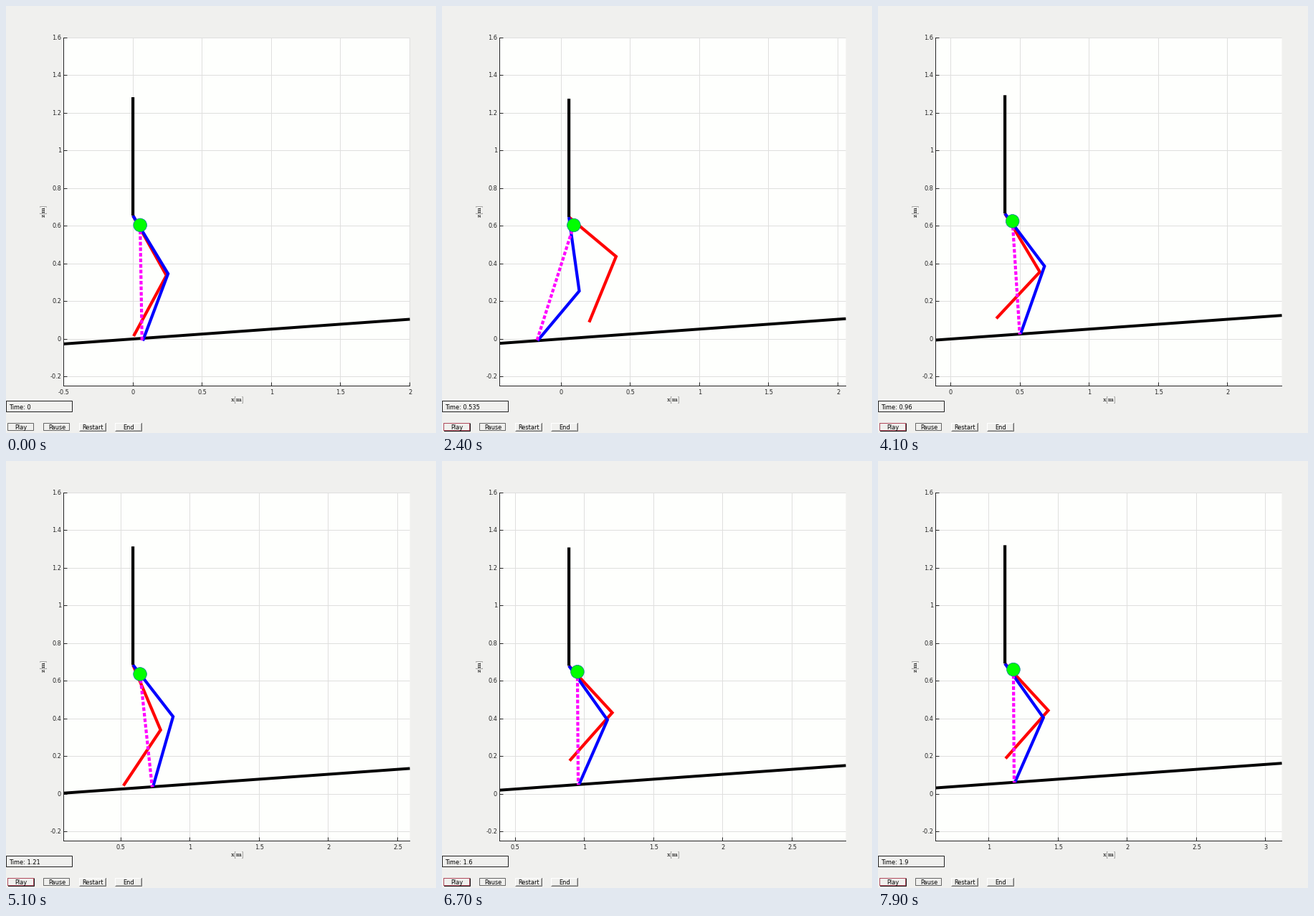
A matplotlib script for the animation above (8000 ms loop, 600x595 px).

```python
import numpy as np
import matplotlib.pyplot as plt
from matplotlib.animation import FuncAnimation
from matplotlib.patches import Circle, Rectangle

W, H, DPI = 600, 595, 100
PX = 72 / DPI                      # one pixel in points
LEFT, RIGHT, TOP, BOTTOM = 80.5, 563.5, 44.5, 529.5
ZERO, SX, SZ = 464, 193.2, 262.16  # ground level row, pixels per metre
SLOPE = np.tan(np.radians(3))
LINK, TORSO, STEP = 0.4, 0.629, 0.3
INK, GRID, PANEL = "#262626", "#dfdfde", "#f0f0ee"

plt.rcParams["font.family"] = "DejaVu Sans"
plt.rcParams["mathtext.fontset"] = "cm"
plt.rcParams["path.snap"] = False

# Footholds in order, and the hip's path along x
FEET = [0.005, 0.0715, -0.169, 0.225, 0.504, 0.733, 0.961, 1.189, 1.418]
HIP_T = np.array([0, .24, .3, .4, .47, .535, .6, .96, 1.21, 1.6, 1.9])
HIP_X = np.array([0, -.008, -.011, -.004, .018, .057, .105, .391, .588,
                  .888, 1.1165])
HIP_V = np.gradient(HIP_X, HIP_T)
HIP_V[0] = 0

CLOCK_K = [2, 12, 24, 41, 51, 67, 79]
CLOCK_T = [0, .24, .535, .96, 1.21, 1.6, 1.9]


def clock(k):
    return round(round(np.interp(k, CLOCK_K, CLOCK_T) / 0.005) * 0.005, 3)


def hermite(t):
    i = int(np.clip(np.searchsorted(HIP_T, t, side="right") - 1,
                    0, len(HIP_T) - 2))
    h = HIP_T[i + 1] - HIP_T[i]
    u = (t - HIP_T[i]) / h
    return (HIP_X[i] * (1 + 2 * u) * (1 - u) ** 2
            + HIP_X[i + 1] * u * u * (3 - 2 * u)
            + h * HIP_V[i] * u * (1 - u) ** 2
            + h * HIP_V[i + 1] * u * u * (u - 1))


def knee_of(hip, foot):
    d = hip - foot
    r = np.hypot(*d)
    bend = np.sqrt(max(LINK ** 2 - r * r / 4, 0))
    return (hip + foot) / 2 + bend * np.array([d[1], -d[0]]) / r


def pose(t):
    n = int(t / STEP + 1e-6)
    s = max(t / STEP - n, 0)
    x = hermite(t)
    hip = np.array([x, 0.642 + 0.0142 * np.cos(2 * np.pi * s) + SLOPE * x])
    stance = np.array([FEET[n + 1], SLOPE * FEET[n + 1]])
    go = s + 0.7 * s ** 3 * (1 - s)
    fx = FEET[n] + (FEET[n + 2] - FEET[n]) * go
    lift = np.sin(np.pi * s) * (0.14 + 0.02 * np.cos(np.pi * s))
    swing = np.array([fx, SLOPE * fx + lift])
    if n == 0:                     # settling from the starting stance
        hip[1] -= 0.012 * np.sin(np.pi * s)
        stance[1] -= 0.013
        swing[1] += 0.015 * (1 - s)

    k1, k2 = knee_of(hip, stance), knee_of(hip, swing)
    com = (hip + 0.096 * (k1 + k2 - 2 * hip)
           + 0.06 * (stance + swing - 2 * hip) + [0, 0.0877])
    return hip, (hip, k1, stance), (hip, k2, swing), com


fig = plt.figure(figsize=(W / DPI, H / DPI), dpi=DPI, facecolor=PANEL)
ax = fig.add_axes([0, 0, 1, 1])
ax.set_xlim(0, W)
ax.set_ylim(H, 0)
ax.axis("off")


def line(xs=(), ys=(), color=INK, width=1, z=3, **kw):
    return ax.plot(xs, ys, color=color, lw=width * PX, zorder=z,
                   solid_joinstyle="miter", solid_capstyle="butt", **kw)[0]


def label(x, y, s, size=8.3, color=INK, **kw):
    kw.setdefault("va", "baseline")
    return ax.text(x, y, s, fontsize=size * PX, color=color, zorder=8, **kw)


def box(x, y, w, h, face, edge="none", z=1):
    p = Rectangle((x, y), w, h, fc=face, ec=edge, lw=PX, zorder=z)
    ax.add_patch(p)
    return p


def row(z):
    return ZERO - SZ * z


def crisp(v):
    return np.floor(v) + 0.5


# Plot area
area = box(LEFT, TOP, RIGHT - LEFT, BOTTOM - TOP, "#fefffd", z=0)
for i in range(-1, 9):
    v = i / 5
    y = crisp(row(v))
    line([LEFT, RIGHT], [y, y], GRID, z=1)
    line([LEFT, LEFT + 5], [y, y], z=2)
    label(77, y + 2.9, f"{v:g}", ha="right")
line([LEFT, LEFT], [TOP - .5, BOTTOM + .5], z=2)
line([LEFT, RIGHT + .5], [BOTTOM, BOTTOM], z=2)
label(322, 549.6, r"$\mathbf{x[m]}$", 9.3, ha="center", va="center")
label(53.7, 286.5, r"$\mathbf{z[m]}$", 9.3, ha="center", va="center",
      rotation=90)

# Controls
box(0.5, 550.5, 92, 15, PANEL, "#222222")
time_text = label(4, 562, "", color="black")
for x, name in ((2.5, "Play"), (52.5, "Pause"), (102.5, "Restart"),
                (152.5, "End")):
    if name in ("Play", "Pause"):
        box(x, 581.5, 36, 10, PANEL, "#666666")
    else:
        line([x, x, x + 37], [592, 581.5, 581.5], "white", z=2)
        line([x, x + 37, x + 37], [592.5, 592.5, 581], "#6c6c6c", z=2)
        line([x + 1, x + 36, x + 36], [591.5, 591.5, 582], "#b0b0ae", z=2)
    label(x + 18.5, 590, name, color="black", ha="center")
focus = [box(2.5, 581.5, 36, 10, PANEL, "#b04a5c", z=2),
         line([3, 39.5, 39.5], [592.5, 592.5, 581.5], "#1a1a1a", z=3)]

# Moving parts
grids = [line(color=GRID, z=1) for _ in range(6)]
marks = [line(z=2) for _ in range(6)]
names = [label(0, 541, "", ha="center") for _ in range(6)]
ground = line(color="black", width=4, z=3)
swing_leg = line(color="red", width=4.2, z=4)
stance_leg = line(color="blue", width=4.2, z=5)
strut = line(color="magenta", width=4.2, z=6, ls=(0, (1.2, 0.65)),
             dash_capstyle="butt")
torso = line(color="black", width=4.2, z=6)
ball = Circle((0, 0), 9.3, fc="#00ff00", ec="#00729a", lw=0.7 * PX, zorder=7)
ax.add_patch(ball)
for part in (ground, swing_leg, stance_leg, strut, torso):
    part.set_clip_path(area)


def draw(k):
    t = clock(k)
    hip, stance, swing, com = pose(t)
    x0 = hip[0] - 0.5

    def put(part, pts):
        p = np.array(pts)
        part.set_data(LEFT + (p[:, 0] - x0) * SX, row(p[:, 1]))

    first = int(np.ceil(x0 * 2 - 1e-6))
    for i in range(6):
        v = (first + i) / 2
        x = LEFT + (v - x0) * SX
        shown = x <= RIGHT + 0.1
        col = crisp(x + 1e-6)
        grids[i].set_data([col, col], [TOP, BOTTOM])
        marks[i].set_data([col, col], [BOTTOM - 5, BOTTOM])
        names[i].set_text(f"{v:g}")
        names[i].set_x(x)
        for part in (grids[i], marks[i], names[i]):
            part.set_visible(shown)

    put(ground, [(x, SLOPE * x) for x in (x0, x0 + 2.5)])
    put(stance_leg, stance)
    put(swing_leg, swing)
    put(strut, [com, stance[2] - [0.006, 0.002]])
    put(torso, [hip, hip + [0, TORSO]])
    ball.center = (LEFT + (com[0] - x0) * SX, row(com[1]))
    time_text.set_text(f"Time: {t:g}")
    for part in focus:
        part.set_visible(k >= 2)
    return []


anim = FuncAnimation(fig, draw, frames=80, interval=100, repeat=True,
                     repeat_delay=0, init_func=lambda: draw(0), blit=False)
plt.show()
```
